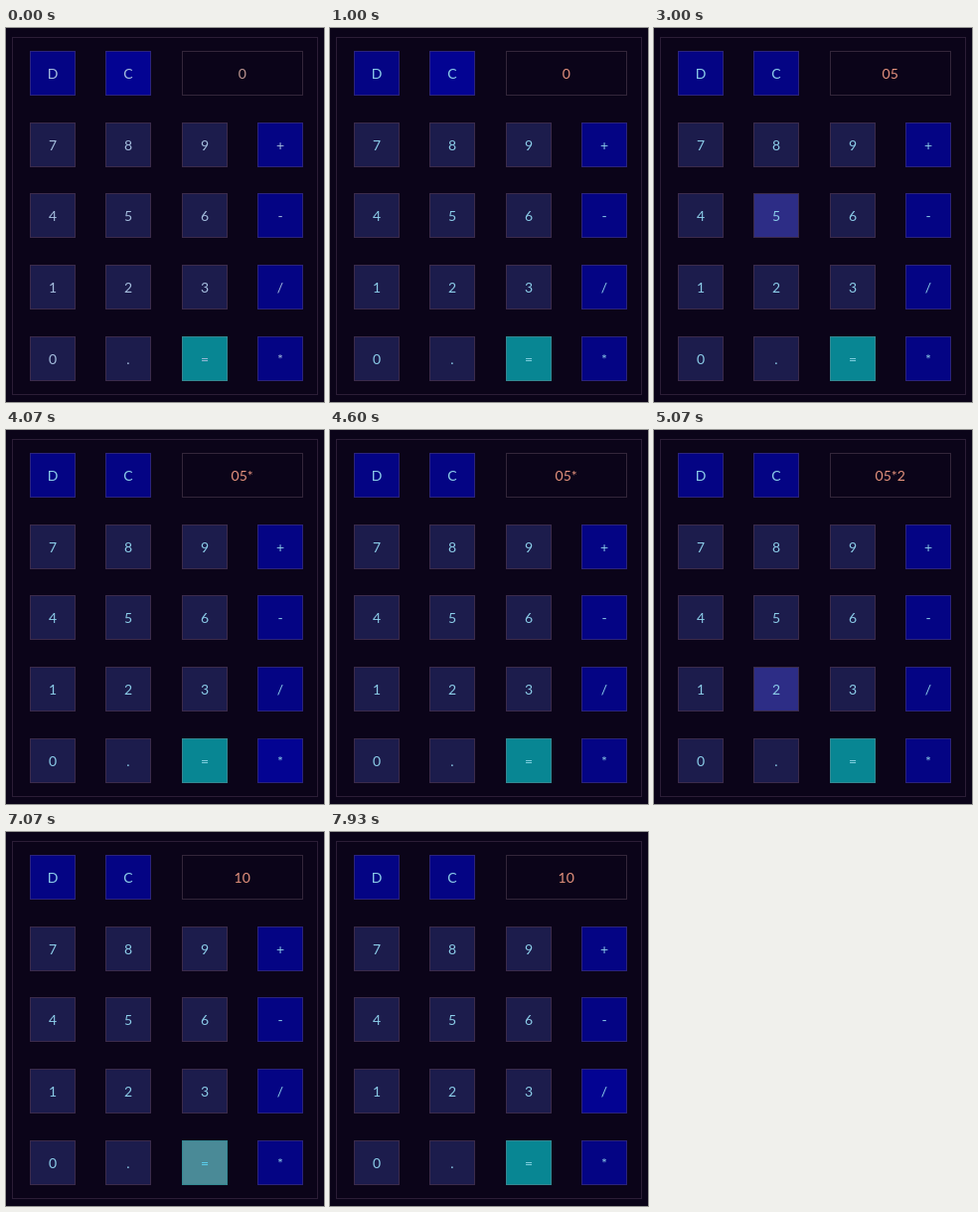
Animation, 320 px wide and 376 px high, one loop 8 s. Source, as an HTML page:

```html
<!DOCTYPE html>
<html lang="en">
<head>
<meta charset="utf-8">
<title>Calculator</title>
<style>
  html, body { margin: 0; width: 100%; height: 100%; overflow: hidden; background: #0b0419; }
  svg { display: block; width: 320px; height: 376px; }
  text { font: 14px Lato, sans-serif; text-anchor: middle; }
</style>
</head>
<body>
<svg id="stage" viewBox="0 0 320 376"></svg>
<script>
const LOOP = 8000;
const FADE = 70;
const stage = document.getElementById('stage');

const styles = {
  digit: { fill: [28, 28, 76], hover: [45, 45, 134], border: '#3b2b4b' },
  operator: { fill: [4, 4, 132], hover: [3, 3, 146], border: '#2b237b' },
  equals: { fill: [8, 134, 147], hover: [74, 138, 151], border: '#348791' }
};

// [key, pointer enters, pointer leaves]
const hovers = [
  ['C', -FADE, 2200], ['8', 2200, 2260], ['5', 2260, 3600],
  ['*', 3730, 4530], ['2', 4730, 5530], ['=', 5730, 7930 - FADE],
  ['/', 7930 - FADE, LOOP + FADE]
];
const readouts = [[0, '0'], [3000, '05'], [4000, '05*'], [5000, '05*2'], [6000, '10']];

function add(tag, attributes, content = '') {
  const node = document.createElementNS('http://www.w3.org/2000/svg', tag);
  for (const name in attributes) node.setAttribute(name, attributes[name]);
  node.textContent = content;
  return stage.appendChild(node);
}

function box(x, y, width, height, stroke) {
  return add('rect', { x: x + .5, y: y + .5, width: width - 1, height: height - 1, fill: 'none', stroke });
}

const clamp = value => Math.max(0, Math.min(1, value));
const mix = (a, b, amount) => `rgb(${a.map((v, i) => Math.round(v + (b[i] - v) * amount))})`;

box(6, 9, 308, 360, '#2b1d36');
box(177, 23, 122, 45, '#33263a');
const display = add('text', { x: 237.7, y: 51 });

const keys = ['DC', '789+', '456-', '123/', '0.=*'].flatMap((row, r) =>
  [...row].map((label, c) => {
    const x = Math.round(24 + 76.33 * c);
    const y = Math.round(23 + 71.7 * r);
    const style = label === '=' ? styles.equals : /[\d.]/.test(label) ? styles.digit : styles.operator;
    const rect = box(x, y, 46, 45, style.border);
    const text = add('text', { x: x + 23, y: y + 28 }, label);
    return { label, style, rect, text };
  }));

function hoverAmount(label, time) {
  return Math.max(0, ...hovers.filter(h => h[0] === label).map(([, enter, leave]) =>
    Math.min(clamp((time - enter) / FADE), 1 - clamp((time - leave) / FADE))));
}

function draw(now) {
  const time = now % LOOP;
  const vivid = clamp((time - 70) / 130);
  for (const { label, style, rect, text } of keys) {
    const hover = hoverAmount(label, time);
    rect.setAttribute('fill', mix(style.fill, style.hover, hover));
    const lit = label === '=' ? mix([139, 214, 230], [92, 212, 244], hover) : 'rgb(139,204,232)';
    text.setAttribute('fill', vivid < 1 ? mix([165, 190, 222], [139, 204, 232], vivid) : lit);
  }
  display.textContent = readouts.filter(([start]) => start <= time).pop()[1];
  display.setAttribute('fill', mix([190, 151, 145], [230, 147, 126], vivid));
}

const start = performance.now();
function tick() {
  draw(performance.now() - start);
  requestAnimationFrame(tick);
}
tick();
</script>
</body>
</html>
```
